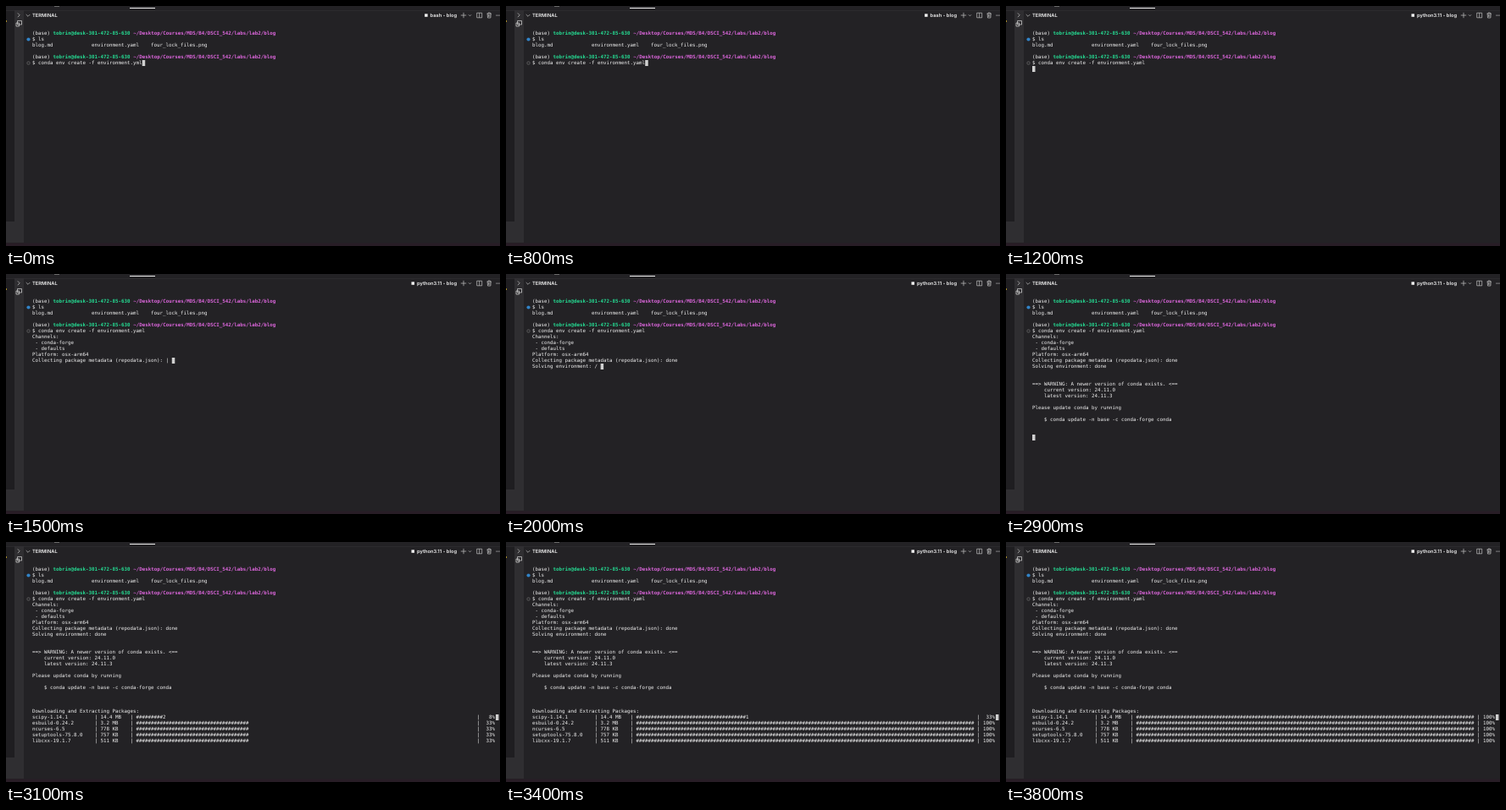
Write an HTML page with a canvas that moves like this. It is 583 px wide and 284 px high and loops after 3.9 s.

```html
<!DOCTYPE html>
<html lang="en">
<head>
<meta charset="utf-8">
<title>Creating an environment</title>
<style>
html, body { margin: 0; width: 100%; height: 100%; overflow: hidden; background: #232225; }
canvas { display: block; }
</style>
</head>
<body>
<canvas width="583" height="284"></canvas>
<script>
const ctx = document.querySelector('canvas').getContext('2d');
const LOOP = 3900, STEP = 100;
const COL = 3.506, ROW = 7, LEFT = 31, TOP = 32.5;
const MONO = '5.824px "DejaVu Sans Mono", monospace';
const SANS = '600 5.75px Inter, sans-serif';
const FG = '#f0f0f0', GREEN = '#25dc93', MAGENTA = '#dc66dc';
const BAR = 114;
const packages = [
  ['scipy-1.14.1', '14.4 MB'], ['esbuild-0.24.2', '3.2 MB'], ['ncurses-6.5', '778 KB'],
  ['setuptools-75.8.0', '757 KB'], ['libcxx-19.1.7', '511 KB']
];
const warning = `

==> WARNING: A newer version of conda exists. <==
    current version: 24.11.0
    latest version: 24.11.3

Please update conda by running

    $ conda update -n base -c conda-forge conda

`.split('\n');

const clamp = v => Math.max(0, Math.min(1, v));

function rect(color, x, y, w, h) {
  ctx.fillStyle = color;
  ctx.fillRect(x, y, w, h);
}

function text(str, x, y, color = FG, font = MONO, align = 'left') {
  ctx.font = font;
  ctx.fillStyle = color;
  ctx.textAlign = align;
  ctx.fillText(str, x, y);
}

function cell(str, col, row, color, font) {
  text(str, LEFT + col * COL, TOP + row * ROW + 1.7, color, font);
}

function stroke(path, color = '#c4c4c4', width = 0.7) {
  ctx.strokeStyle = color;
  ctx.lineWidth = width;
  ctx.stroke(new Path2D(path));
}

function dot(x, y, r, color) {
  ctx.fillStyle = color;
  ctx.beginPath();
  ctx.arc(x, y, r, 0, 7);
  ctx.fill();
}

function drawWindow(title) {
  rect('#232225', 0, 0, 583, 284);
  rect('#2f2e31', 10, 5, 11, 275);
  rect('#2f2e31', 0, 255, 21, 25);
  rect('#1f1e21', 0, 5, 10, 250);
  rect('#323134', 0, 5, 583, 0.6);
  rect('#281d26', 0, 280.5, 583, 3.5);
  rect('#f0f0f0', 146, 2, 30, 1);
  rect('#6b6b6b', 57, 0, 6, 1);
  rect('#a58a28', 0, 17, 1, 2);

  stroke('M13.8 8.4l2.4 2.4l-2.4 2.4M23.7 10l2.3 2.3l2.3-2.3');
  stroke('M13.5 17.5h5v4.5h-5zM12 20h3.5v4h-3.5z', '#d8d8d8');
  text('TERMINAL', 31, 13, FG, SANS);
  text(title, 532, 13, FG, SANS, 'right');
  rect(FG, 532 - ctx.measureText(title).width - 6.5, 9.3, 3.5, 3.5);
  stroke('M536.8 11h6.4M540 7.8v6.4M546 10.3l1.5 1.5l1.5-1.5');
  stroke('M555.7 8.2h6v5.6h-6zM558.7 8.2v5.6');
  stroke('M567.5 9h5.4M569 9v-1h2.4v1M568.2 9l.3 5h3.4l.3-5M569.5 10.2v2.6M570.9 10.2v2.6');
  for (const x of [579, 581, 583]) dot(x, 11, 0.6, FG);

  dot(26.5, 39.5, 2.1, '#3183c8');
  stroke('M24.8 67.5a1.7 1.7 0 1 0 3.4 0a1.7 1.7 0 1 0-3.4 0', '#7c7c7c', 0.6);
}

function drawPrompt(row) {
  cell('(base)', 0, row);
  cell('tobrin@desk-301-472-85-630', 7, row, GREEN, 'bold ' + MONO);
  cell('~/Desktop/Courses/MDS/B4/DSCI_542/labs/lab2/blog', 34, row, MAGENTA, 'bold ' + MONO);
}

function progressLine([name, size], done) {
  const units = Math.floor(done * BAR * 10 + 1e-6);
  const bar = '#'.repeat(units / 10) + (units % 10 || '');
  const percent = Math.round(done * 100) + '%';
  return `${name.padEnd(21)}| ${size.padEnd(10)}| ${bar.padEnd(BAR)} | ${percent.padStart(4)}`;
}

function terminalLines(t) {
  const typed = ['yml', 'yml', 'ym', 'y', 'ya', 'yam', 'yaml'][Math.min(6, t / STEP)];
  const lines = ['', '$ ls', 'blog.md'.padEnd(20) + 'environment.yaml'.padEnd(20) + 'four_lock_files.png',
    '', '', '$ conda env create -f environment.' + typed];
  const spinner = '/-\\|'[t / STEP % 4] + ' ';
  if (t >= 1000 && t < 1300) lines.push('');
  if (t >= 1300) {
    lines.push('Channels:', ' - conda-forge', ' - defaults', 'Platform: osx-arm64',
      'Collecting package metadata (repodata.json): ' + (t < 1900 ? spinner : 'done'));
  }
  if (t >= 1900) lines.push('Solving environment: ' + (t < 2200 ? spinner : 'done'));
  if (t >= 2200) lines.push(...warning, '');
  if (t >= 3000) {
    const large = t <= 3400 ? 0.3255 * clamp((t - 3000) / 400) : clamp(0.3255 + (t - 3400) / 296);
    lines.push('Downloading and Extracting Packages:');
    packages.forEach((p, i) => lines.push(progressLine(p, i ? clamp((t - 3000) / 300) : large)));
  }
  return lines;
}

function draw(now) {
  const t = Math.floor(now % LOOP / STEP) * STEP;
  ctx.textRendering = 'geometricPrecision';
  drawWindow((t < 1100 ? 'bash' : 'python3.11') + ' - blog');
  drawPrompt(0);
  drawPrompt(4);
  const lines = terminalLines(t);
  lines.forEach((line, row) => cell(line, 0, row));
  const row = t < 3000 ? lines.length - 1 : 25;
  rect('#d0d0d0', LEFT + lines[row].length * COL, TOP + row * ROW - 3.5, COL, ROW);
}

function frame() {
  draw(performance.now());
  requestAnimationFrame(frame);
}
frame();
</script>
</body>
</html>
```
